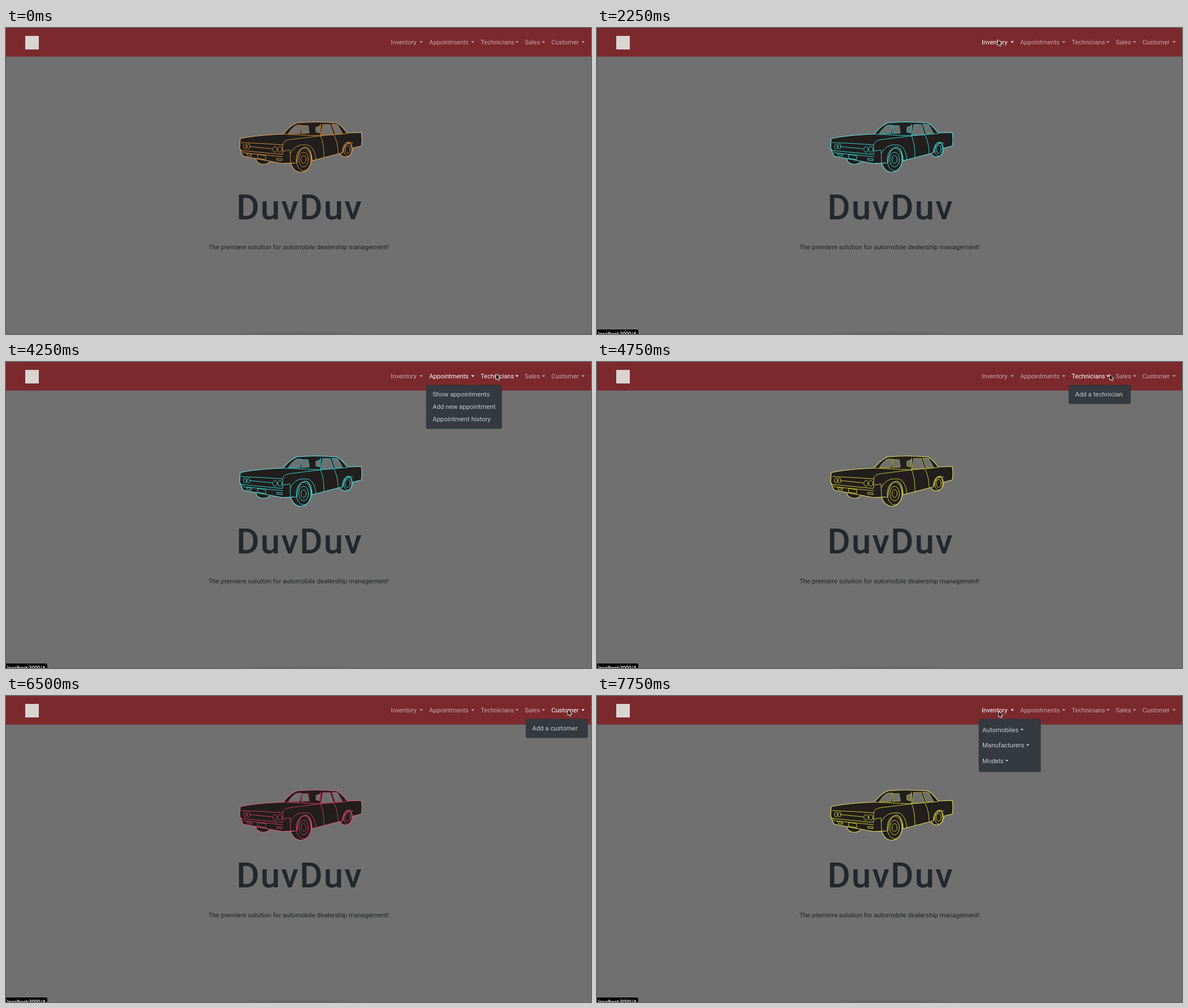
Animation, 1034 px wide and 542 px high, one loop 8000 ms. Source, as an HTML page:

```html
<!DOCTYPE html>
<html lang="en">
<head>
<meta charset="utf-8">
<title>DuvDuv</title>
<style>
  html, body { margin: 0; width: 100%; height: 100%; overflow: hidden; background: #707070; }
  svg { display: block; width: 100vw; height: 100vh; }
  text { font: 11.4px Roboto, sans-serif; }
  .tagline { font-size: 11.5px; fill: #202326; text-anchor: middle; }
  .title { font-size: 62px; font-weight: 500; letter-spacing: 2px; fill: #24272b; text-anchor: middle; }
  .status text { font-size: 8.8px; font-weight: 500; fill: #fff; }
  .link { fill: #fff; }
  .link text { font-size: 11.1px; }
  .menu { fill: #c8cacc; }
  .menu rect { fill: #343a40; stroke: #2b2f33; stroke-width: .6; }
  #car { --line: hsl(var(--hue) 60% 51%); --edge: hsl(var(--hue) 72% 64%); stroke-linejoin: round; stroke-linecap: round; }
  .body { fill: #211e1d; stroke: var(--edge); stroke-width: 1.1; }
  .glass { fill: #707070; stroke: var(--line); stroke-width: .8; }
  .trim { fill: none; stroke: var(--line); }
</style>
</head>
<body>
<svg viewBox="0 0 1034 542" preserveAspectRatio="none">
  <defs>
    <radialGradient id="shade">
      <stop offset="0" stop-color="#626262"/>
      <stop offset="1" stop-color="#626262" stop-opacity="0"/>
    </radialGradient>
  </defs>
  <rect width="1034" height="542" fill="#707070"/>
  <ellipse cx="515" cy="543" rx="155" ry="6" fill="url(#shade)"/>
  <rect width="1034" height="50.600" fill="#7b292d"/>
  <rect x="34" y="14" width="24" height="24" fill="#d8d5d0"/>

  <g id="car">
    <g class="body">
      <ellipse cx="455" cy="232" rx="13" ry="9.500"/>
      <ellipse cx="600" cy="212" rx="13" ry="16.500"/>
      <ellipse cx="521" cy="231" rx="19" ry="24.500"/>
      <path d="M414 196Q440 190 490 188Q502 173 514 168Q545 165 584 168Q592 171 603 186L628 185Q630 198 628 209
        L612 213Q611 202 605 204Q598 207 595 221L541 235Q540 213 529 211Q516 213 514 239L488 240L419 227L413 213Z"/>
    </g>
    <path class="glass" d="M499 187Q506 176 514 172H523L519 187ZM524 173H534L536 186L522 187Z
      M548 176L556 173L554 186L548 184ZM560 171H573L579 189L557 190ZM576 170L586 171L595 187L582 188Z"/>
    <g class="trim">
      <path d="M490 188L556 191L603 187M556 170V191Q562 204 562 229M580 190Q587 204 587 222"/>
      <path d="M416 203Q450 204 489 207Q490 200 500 198L556 191M431 210L470 214"/>
      <path d="M417 217L489 224V207M414 214L420 221L489 228M490 218L502 216L503 238"/>
      <path d="M503 222Q511 205 530 207Q545 207 548 234M594 220Q596 202 606 202L613 204"/>
      <path d="M445 224L459 226V233L445 231ZM426 222L434 224V227L427 226ZM479 231L488 232V235L479 234Z"/>
      <g id="rings"></g>
    </g>
  </g>

  <text class="title" x="519" y="339">DuvDuv</text>
  <text class="tagline" x="517" y="392">The premiere solution for automobile dealership management!</text>

  <g id="nav"></g>
  <g id="menus"></g>
  <g id="status" class="status">
    <path d="M0 534H70Q73 534 73 537V542H0Z"/>
    <text x="2" y="544.500">localhost:3000/#</text>
  </g>
  <path id="cursor" d="M0 0V10.500L2.400 8.300L4 12L5.800 11.200L4.200 7.600H7.600Z"
    fill="#000" stroke="#fff" stroke-width=".9" stroke-linejoin="round"/>
</svg>
<script>
const STEP = 250, STEPS = 32;
const HUES = [33, 180, 340, 57];
const NAV_BOTTOM = 51, MENU_TOP = 41, MENU_MIN = 109, STAGE_WIDTH = 1034;

const LINKS = [
  { name: 'Inventory', x: 680, items: ['Automobiles', 'Manufacturers', 'Models'], nested: true },
  { name: 'Appointments', x: 748, items: ['Show appointments', 'Add new appointment', 'Appointment history'] },
  { name: 'Technicians', x: 839, items: ['Add a technician'] },
  { name: 'Sales', x: 917, items: ['View all sales', 'View employee sales', 'Add sale', 'Add salesperson'] },
  { name: 'Customer', x: 964, items: ['Add a customer'] }
];
LINKS.forEach((link, i) => {
  link.left = link.x - 5;
  link.right = (LINKS[i + 1]?.x ?? STAGE_WIDTH) - 6;
});

// Where the pointer turns or pauses, and the steps at which it clicks
const STOPS = [
  { step: 2, x: 773, y: 166 },
  { step: 4, x: 772, y: 154 },
  { step: 8, x: 708, y: 20 },
  { step: 12, x: 710, y: 24 },
  { step: 17, x: 866, y: 21 },
  { step: 20, x: 920, y: 22 },
  { step: 22, x: 929, y: 24 },
  { step: 26, x: 993, y: 24 },
  { step: 27, x: 1020, y: 90 },
  { step: 30, x: 710, y: 27 }
];
const CLICKS = [11, 14, 18, 21, 25, 27, 30];

const $ = id => document.getElementById(id);
const show = (el, on) => { el.style.display = on ? '' : 'none'; };

function add(parent, tag, attrs = {}, text = '') {
  const el = document.createElementNS('http://www.w3.org/2000/svg', tag);
  for (const key in attrs) el.setAttribute(key, attrs[key]);
  el.textContent = text;
  return parent.appendChild(el);
}
const caret = (parent, x, y) => add(parent, 'path', { d: `M${x} ${y}h6l-3 3z` });

function rings(cx, cy, rx, ry, scales = [1]) {
  for (const s of scales) add($('rings'), 'ellipse', { cx, cy, rx: rx * s, ry: ry * s });
}

function buildLink(link) {
  const group = add($('nav'), 'g', { class: 'link' });
  add(group, 'text', { x: link.x, y: 29 }, link.name);
  caret(group, link.right - 11, 23.5);
  return group;
}

// Menus align left with their link, or right when they would leave the stage
function buildMenu({ left, right, items, nested }) {
  const group = add($('menus'), 'g', { class: 'menu' });
  const box = add(group, 'rect', { y: MENU_TOP, rx: 2.5 });
  const row = nested ? 27.4 : 22, indent = nested ? 6 : 11;
  const labels = items.map((item, i) =>
    add(group, 'text', { y: MENU_TOP + 9 + row * (i + .5) }, item));
  const lengths = labels.map(el => el.getComputedTextLength());
  const width = Math.max(MENU_MIN, Math.max(...lengths) + 22);
  const x = left + width > STAGE_WIDTH ? right - width : left;

  box.setAttribute('x', x);
  box.setAttribute('width', width);
  box.setAttribute('height', 11 + row * items.length);
  labels.forEach((el, i) => {
    el.setAttribute('x', x + indent);
    if (nested) caret(group, x + indent + lengths[i] + 3, el.getAttribute('y') - 5.5);
  });
  return group;
}

for (const x of [422.5, 428.5]) rings(x, 210, 2.6, 4.2);
for (const x of [475.5, 484]) rings(x, 215, 3.9, 4.9);
rings(526, 233, 13, 20, [1, .65, .35]);
rings(604, 215, 7, 12, [1, .6]);
const links = LINKS.map(buildLink), menus = LINKS.map(buildMenu);

function pointerAt(step) {
  const next = STOPS.find(s => s.step > step);
  if (!next) return STOPS.at(-1);
  const prev = STOPS[Math.max(0, STOPS.indexOf(next) - 1)];
  if (prev === next) return next;
  const t = (step - prev.step) / (next.step - prev.step), k = t * t * (3 - 2 * t);
  return { x: prev.x + (next.x - prev.x) * k, y: prev.y + (next.y - prev.y) * k };
}

function hoverAt(step) {
  const { x, y } = pointerAt(step);
  return y < NAV_BOTTOM ? LINKS.findIndex(l => x >= l.left && x < l.right) : -1;
}

// A click opens the menu under the pointer; off the links it closes the open one
function openAt(step) {
  const click = CLICKS.findLast(c => c <= step);
  return click === undefined ? -1 : hoverAt(click);
}

// Links brighten while the pointer stays on them
function brightness(link, step) {
  if (openAt(step) === link) return 1;
  let held = 0;
  while (held < 3 && hoverAt(step - held) === link) held++;
  return Math.min(1, .58 + .18 * held);
}

function draw(step) {
  const open = openAt(step), { x, y } = pointerAt(step);
  $('car').style.setProperty('--hue', HUES[step % HUES.length]);
  links.forEach((el, i) => { el.style.fillOpacity = brightness(i, step); });
  menus.forEach((el, i) => show(el, i === open));
  show($('status'), open >= 0 || hoverAt(step) >= 0);
  show($('cursor'), step >= STOPS[0].step);
  $('cursor').setAttribute('transform', `translate(${x} ${y})`);
}

const start = performance.now();
let shown = -1;
function tick() {
  const step = Math.floor((performance.now() - start) / STEP) % STEPS;
  if (step !== shown) draw(shown = step);
  requestAnimationFrame(tick);
}
tick();
</script>
</body>
</html>
```
